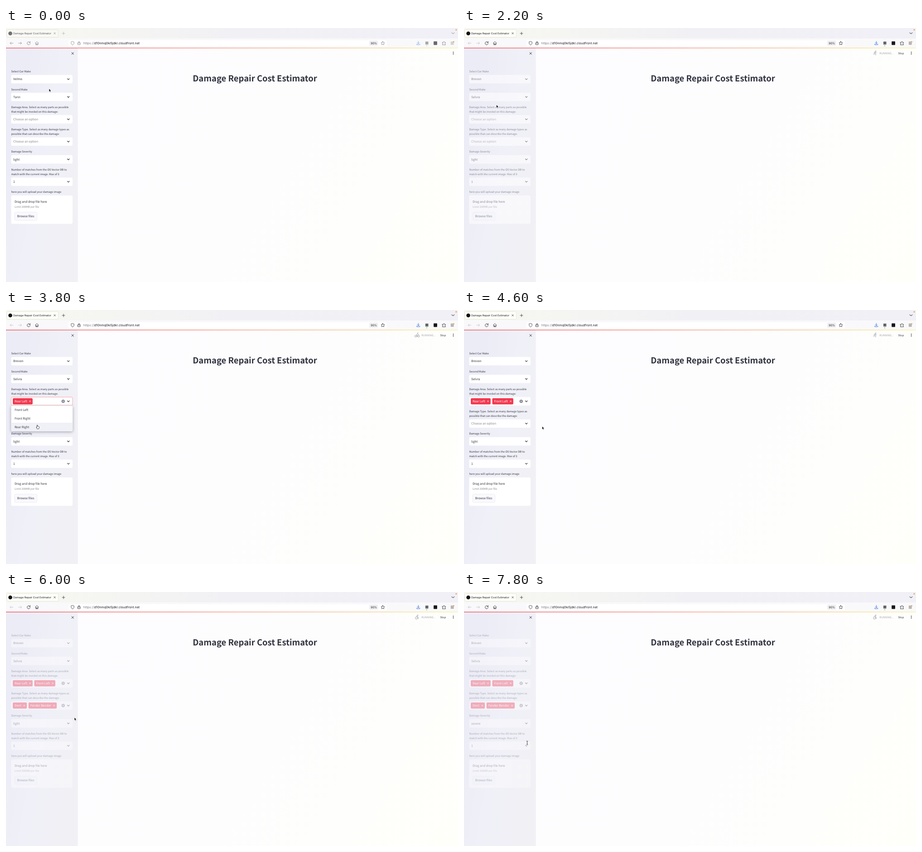
An HTML page with a canvas that plays this animation: 998 by 561 pixels, repeating every 8000 ms.

```html
<!DOCTYPE html>
<html lang="en">
<head>
<meta charset="utf-8">
<title>Damage Repair Cost Estimator</title>
<style>
  html, body { margin: 0; width: 100%; height: 100%; overflow: hidden; background: #fdfdff; }
  canvas { display: block; width: 100vw; height: 100vh; }
</style>
</head>
<body>
<canvas id="stage" width="998" height="561"></canvas>
<script>
const ctx = document.getElementById('stage').getContext('2d');
ctx.textRendering = 'geometricPrecision';
const LOOP = 8000, STEP = 200, ROW = 18.8;
const PAGE = '"Noto Sans CJK JP", "Noto Sans CJK SC", "Noto Sans CJK", Lato, sans-serif';
const CHROME = 'Inter, Roboto, sans-serif';
const INK = '#31333f', MUTED = '#84868f', LABEL = 5.88, VALUE = 6.74;

const rowY = { make: 113, model: 152.3, area: 201.6, type: 250.8, severity: 290.1, matches: 339.5 };

const labels = [
  [96, 'Select Car Make'], [135.4, 'Second Make'],
  [174.6, 'Damage Area. Select as many parts as possible'],
  [184.9, 'that might be involed on this damage:'],
  [223.8, 'Damage Type. Select as many damage types as'],
  [234.2, 'possible that can describe the damage:'],
  [273.2, 'Damage Severity'],
  [312.6, 'Number of matches from the OS Vector DB to'],
  [322.9, 'match with the current image. Max of 3'],
  [362.2, 'here you will upload your damage image']
];

// [start, end, field, options]
const menus = [
  [600, 1400, 'make', ['Velmo', 'Kordia', 'Brevon']],
  [3400, 3800, 'area', ['Front Left', 'Front Right', 'Rear Left', 'Rear Right']],
  [3800, 4200, 'area', ['Front Left', 'Front Right', 'Rear Right']],
  [4200, 4400, 'area', ['Front Right', 'Rear Right']],
  [5000, 5200, 'type', ['Dent', 'Scratch', 'Fender Bender', 'Broken']],
  [5200, 5600, 'type', ['Scratch', 'Fender Bender', 'Broken']],
  [5600, 6000, 'type', ['Scratch', 'Broken']],
  [6400, 7200, 'severity', ['light', 'moderate', 'severe', 'major']]
];

// [time, pointer kind, x, y]
const pointerTrack = [
  [0, 'arrow', 95, 134], [400, 'beam', 88, 116], [600, 'beam', 74, 114],
  [800, 'hand', 71, 135], [1200, 'hand', 71, 170], [1400, 'arrow', 71, 167],
  [3000, 'arrow', 72, 172], [3200, 'beam', 71, 201], [3400, 'hand', 70, 240],
  [3600, 'hand', 70, 262], [3800, 'hand', 70, 258], [4000, 'hand', 70, 225],
  [4200, 'hand', 74, 224], [4400, 'arrow', 168, 243], [4600, 'arrow', 172.5, 257],
  [4800, 'beam', 100, 252], [5000, 'hand', 73, 273], [5200, 'hand', 73, 276],
  [5400, 'hand', 74, 295], [5600, 'hand', 74, 295], [5800, 'hand', 82, 290],
  [6000, 'arrow', 151, 277], [6200, 'beam', 100, 290], [6400, 'hand', 72, 313],
  [6800, 'hand', 72, 340], [7000, 'hand', 72, 350], [7200, 'arrow', 82, 348],
  [7400, 'beam', 110, 342], [7800, 'beam', 139.5, 333]
];

// [time, opacity of the widgets while the app reruns]
const opacityTrack = [
  [0, 1], [1600, 1], [2000, .55], [2400, .55], [2600, 1], [3800, 1], [4000, .6],
  [4200, .6], [4400, 1], [4800, 1], [5400, .5], [6000, .38], [8000, .36]
];

function sample(track, t) {
  let i = track.length - 1;
  while (track[i][0] > t) i--;
  const a = track[i], b = track[i + 1] || a;
  const k = b === a ? 0 : (t - a[0]) / (b[0] - a[0]);
  return a.map((v, j) => typeof v === 'number' ? v + (b[j] - v) * k : v);
}

function gradient(x0, y0, x1, y1, ...colors) {
  const g = ctx.createLinearGradient(x0, y0, x1, y1);
  colors.forEach((c, i) => g.addColorStop(i / (colors.length - 1), c));
  return g;
}
const sidebarFill = gradient(0, 300, 159, 330, '#ececf6', '#f0f0f8', '#f0f0f5');
const pageFill = gradient(159, 45, 998, 561, '#fdfdff', '#fdfdfe', '#fffffa');

function rect(x, y, w, h, fill) {
  ctx.fillStyle = fill;
  ctx.fillRect(x, y, w, h);
}

function box(x, y, w, h, r, fill, stroke) {
  ctx.beginPath();
  ctx.roundRect(x, y, w, h, r);
  if (fill) { ctx.fillStyle = fill; ctx.fill(); }
  if (stroke) { ctx.strokeStyle = stroke; ctx.lineWidth = .7; ctx.stroke(); }
}

function dot(x, y, r, fill) {
  ctx.beginPath();
  ctx.arc(x, y, r, 0, 7);
  ctx.fillStyle = fill;
  ctx.fill();
}

// y is the middle of the capital letters
function text(s, x, y, size, color = INK, family = PAGE, weight = 400) {
  ctx.font = `${weight} ${size}px ${family}`;
  ctx.fillStyle = color;
  ctx.fillText(s, x, y + size * .36);
  return ctx.measureText(s).width;
}

function icon(d, x, y, color, width = .9, fill) {
  const path = new Path2D(d);
  ctx.save();
  ctx.translate(x, y);
  ctx.lineWidth = width;
  ctx.lineCap = ctx.lineJoin = 'round';
  if (fill) { ctx.fillStyle = fill; ctx.fill(path); }
  if (width) { ctx.strokeStyle = color; ctx.stroke(path); }
  ctx.restore();
}

const cross = (x, y, r, color, width) =>
  icon(`M${-r} ${-r}L${r} ${r}M${r} ${-r}L${-r} ${r}`, x, y, color, width);
const chevron = (x, y, color = INK, w = 2.2) => icon(`M${-w} -1.1L0 1.2L${w} -1.1`, x, y, color, 1.1);

function drawBrowser(active) {
  const ink = active ? '#2b2b33' : '#85858c', faint = active ? '#c6c6ca' : '#98989f';
  rect(0, 0, 998, 24, gradient(0, 0, 998, 0, '#f8f8f0', '#f1f1f5', '#f0f0f6'));
  rect(0, 23, 998, 21, '#f9f9fb');
  box(1.5, 3.5, 114, 17, 2.5, active ? '#fefef9' : '#f8f8f5', '#dedecf');
  dot(9.5, 12, 4.3, active ? '#111118' : '#707076');
  text('Damage Repair Cost Estimator', 16, 12, 5.84, active ? '#18181f' : '#55555c', CHROME);
  cross(107.5, 11.8, 1.8, ink, .8);
  icon('M-3 0H3M0 -3V3', 127, 12, active ? ink : '#b0b0b6', .8);
  chevron(987, 11.5, active ? '#55555c' : '#a0a0a6', 3);
  dot(994, 4, 1.6, '#f5a03c');

  icon('M3.5 0H-3.5M-.8 -2.7L-3.5 0L-.8 2.7', 12.5, 33.5, faint);
  icon('M-3.5 0H3.5M.8 -2.7L3.5 0L.8 2.7', 31, 33.5, faint);
  icon('M2.6 -2A3.4 3.4 0 1 0 3.4 .6M3.4 -3.6V-1.3H1', 50, 33.5, ink);
  icon('M-3.7 0L0 -3.6L3.7 0M-2.7 -.7V3.4H2.7V-.7M-.7 3.3V1H.7V3.3', 68.2, 33.5, ink, .8);
  box(138, 27, 703, 13, 2.5, '#fff');
  icon('M0 -3.8L3.2 -2.6V0C3.2 2 1.8 3.2 0 4C-1.8 3.2 -3.2 2 -3.2 0V-2.6Z', 147, 33.5, ink, .8);
  icon('M-2.5 -.5H2.5V3.4H-2.5ZM-1.6 -.5V-2A1.6 1.6 0 0 1 1.6 -2V-.5', 161.3, 33.4, ink, .9);
  const w = text('https://', 170.8, 33.5, 7, '#77777e', CHROME);
  text('d10nmq0ki5jdkl.cloudfront.net', 170.8 + w, 33.5, 7.03, '#17171f', CHROME);
  box(802, 28, 19.5, 11, 2, '#efeff2');
  text('90%', 805.3, 33.6, 6.2, '#25252d', CHROME);
  icon('M0 -4L1.2 -1.4L4 -1L2 .9L2.5 3.7L0 2.4L-2.5 3.7L-2 .9L-4 -1L-1.2 -1.4Z', 832, 33.5, ink, .8);
  icon('M0 -4V1.5M-2.3 -.8L0 1.5L2.3 -.8M-3.4 2V3.6H3.4V2', 910.3, 33.3, active ? '#2469df' : '#79a2e5');
  box(926, 30, 6.5, 6.5, 0, active ? '#62656a' : '#a5a7ab');
  dot(929, 39.3, 1, active ? '#4cc58a' : '#a7d8bf');
  box(944.2, 29.6, 7.8, 7.8, 1, active ? '#17171c' : '#67676c');
  icon('M-3.3 -2H-1V-3Q0 -4.5 1 -3V-2H3.3V.2H2.4Q1 1.2 2.4 2.1H3.3V3.8H-3.3V1.8H-2.4Q-1 .9 -2.4 0H-3.3Z', 967, 33.5, ink, .8);
  icon('M-3 -2.5H3M-3 0H3M-3 2.5H3', 985.3, 33.5, ink, .8);
  dot(988.4, 30.4, 1.5, '#f5a03c');
}

function drawSelect(field, value, focused, placeholder) {
  const y = rowY[field];
  box(11.4, y - 9.3, 135.6, 18.6, 3, '#fff', focused ? '#ff8585' : null);
  if (Array.isArray(value) && value.length) {
    let x = 15;
    for (const tag of value) {
      ctx.font = `400 ${VALUE}px ${PAGE}`;
      const w = ctx.measureText(tag).width + 16;
      box(x, y - 6.8, w, 13.6, 2, '#f2384e');
      text(tag, x + 4, y, VALUE, '#fff');
      cross(x + w - 5.8, y, 1.3, '#fff', .9);
      x += w + 3.7;
    }
    dot(126.2, y, 3.7, '#858793');
    cross(126.2, y, 1.2, '#fff', .8);
  } else {
    const w = text(placeholder ? 'Choose an option' : value, 16, y, VALUE, placeholder ? MUTED : INK);
    if (focused && !placeholder) rect(16.4 + w, y - 3.5, .6, 7, INK);
  }
  chevron(137.7, y);
}

function drawSidebar(t, openField, opacity) {
  rect(0, 45, 158.6, 516, sidebarFill);
  for (const [y, s] of labels) text(s, 11.4, y, LABEL);

  const picked = (...pairs) => pairs.filter(p => t >= p[0]).map(p => p[1]);
  const areas = picked([3800, 'Rear Left'], [4200, 'Front Left']);
  const types = picked([5200, 'Dent'], [5600, 'Fender Bender']);
  const values = {
    make: t < 1400 ? 'Velmo' : 'Brevon',
    model: t < 1800 ? 'Tarin' : 'Selvra',
    area: areas, type: types,
    severity: t < 7200 ? 'light' : 'severe',
    matches: '1'
  };
  for (const field in values)
    drawSelect(field, values[field], field === openField, values[field].length === 0);

  box(11.4, 369.8, 135.6, 62.7, 3, '#fff');
  text('Drag and drop file here', 18.9, 383.2, VALUE);
  text('Limit 200MB per file', 18.9, 395.3, LABEL, MUTED);
  box(18.9, 406.6, 49.8, 18.5, 3, '#f9f9fe', '#e9e9f0');
  text('Browse files', 24.7, 416, VALUE);

  ctx.globalAlpha = 1 - opacity;
  rect(0, 75, 158.6, 365, sidebarFill);
  ctx.globalAlpha = 1;
  cross(147.2, 56.2, 2.2, INK, 1);
}

function drawMenu([, , field, options], pointerY) {
  const top = rowY[field] + 9.7, h = options.length * ROW;
  ctx.save();
  ctx.shadowColor = 'rgba(30,30,50,.38)';
  ctx.shadowBlur = 6;
  ctx.shadowOffsetY = 1.5;
  box(11.4, top, 135.8, h, 3, '#fff');
  ctx.restore();
  const hover = Math.floor((pointerY - 4 - top) / ROW);
  options.forEach((s, i) => {
    if (i === hover) box(11.4, top + i * ROW, 135.8, ROW, i === options.length - 1 ? [0, 0, 3, 3] : 0, '#f0f1f7');
    text(s, 18.9, top + (i + .5) * ROW, VALUE);
  });
}

const statusIcons = [
  // wheelchair, bicycle, runner
  'M-.2 -1.8L1.5 -1L.2 1H2.6L2 4M-2.4 -1.3L-.2 -2.7L1.8 -1.1M.6 2.3A2.3 2.3 0 1 1 -1.5 -.1',
  'M-5.2 2.2A2.1 2.1 0 1 0 -1 2.2A2.1 2.1 0 1 0 -5.2 2.2M1 2.2A2.1 2.1 0 1 0 5.2 2.2A2.1 2.1 0 1 0 1 2.2M0 3V.8L-1.7 -.7L.3 -2.4L1.8 -.9H3.4',
  'M-2.7 -.4L-2 -2L.4 -2.5L1.4 -.9L3 -.5M.4 -2.5L-.6 .6L1.2 1.8V4.3M-.6 .6L-1.4 2.3L-3.7 1.9'
];

function drawStatus(t) {
  const kind = (t / STEP) % 3;
  icon(statusIcons[kind], 907.8, 55.5, '#8b8d96', .8);
  dot(909.2, 51.3, 1, '#8b8d96');
  text('RUNNING...', 917.2, 55.6, LABEL, '#a5a6ad');
  text('Stop', 958.6, 55.6, LABEL, INK);
}

const pointers = {
  arrow: (x, y) => icon('M0 0V6.7L1.5 5.4L2.6 7.9L3.8 7.4L2.7 4.9H4.7Z', x, y, '#fff', .7, '#000'),
  hand: (x, y) => icon('M-1.7 1V-3.6Q-1 -4.8 -.3 -3.6V-1.2Q.5 -1.8 1 -.9Q1.8 -1.4 2.2 -.5Q3.2 -.8 3.3 .4Q3.3 3 2.2 4.6H-1.2Q-2.2 2.9 -3.4 1.2Q-3.3 0 -1.7 1Z', x, y, '#222', .8, '#fff'),
  beam: (x, y) => icon('M-1.4 -3.8Q0 -3.8 0 -2.8Q0 -3.8 1.4 -3.8M0 -2.8V2.8M-1.4 3.8Q0 3.8 0 2.8Q0 3.8 1.4 3.8', x, y, '#222', .8)
};

function draw(t) {
  const [, kind, x, y] = sample(pointerTrack, t);
  const menu = menus.find(m => t >= m[0] && t < m[1]);
  const running = (t >= 1400 && t < 2600) || (t >= 3800 && t < 4400) || t >= 4600;

  rect(0, 0, 998, 561, pageFill);
  drawBrowser(t >= 200);
  drawSidebar(t, menu && menu[2], sample(opacityTrack, t)[1]);
  rect(0, 43.6, 998, 1.4, gradient(0, 0, 998, 0, '#f4505c', '#f9a08c', '#fbf3a0'));
  text('Damage Repair Cost Estimator', 412.2, 111.7, 18.45, INK, PAGE, 700);
  for (const dy of [-2.3, 0, 2.3]) dot(987.6, 55.5 + dy, .85, INK);
  if (running) drawStatus(t);
  if (menu) drawMenu(menu, y);
  pointers[kind](x, y);
}

function frame(now) {
  draw(Math.floor(now % LOOP / STEP) * STEP);
  requestAnimationFrame(frame);
}
draw(0);
requestAnimationFrame(frame);
</script>
</body>
</html>
```
